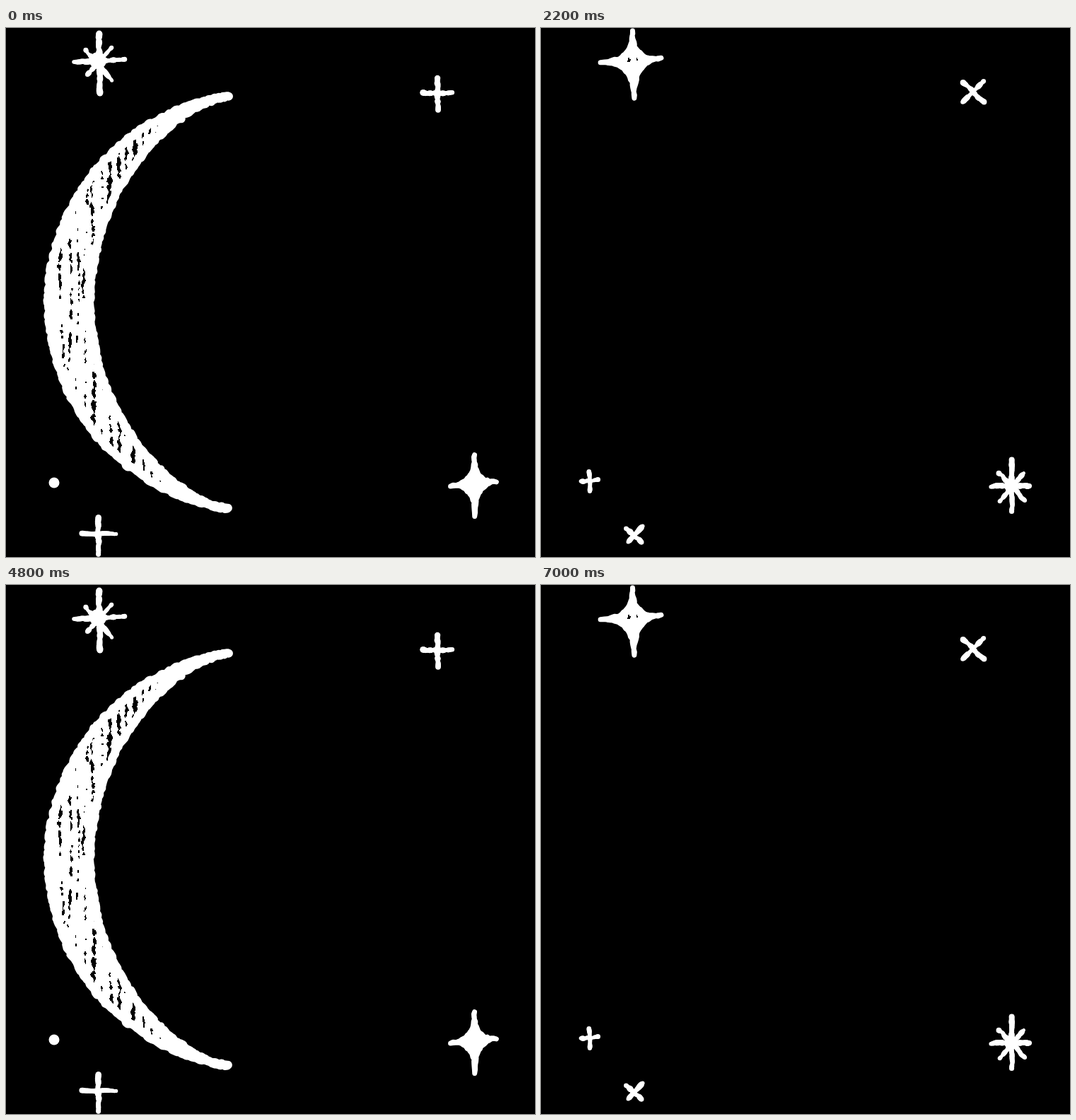
Animation of 748x748 px, one loop 7.2 s. Source, as an HTML page with a canvas:

```html
<!DOCTYPE html>
<html lang="en">
<head>
<meta charset="utf-8">
<title>Moon phases</title>
<style>
html, body { margin: 0; width: 100%; height: 100%; overflow: hidden; background: #000; }
canvas { display: block; width: 100vw; height: 100vh; }
</style>
</head>
<body>
<canvas id="sky" width="748" height="748"></canvas>
<script>
const ctx = document.getElementById('sky').getContext('2d');
const STEP = 200, COUNT = 12;
const CY = 388, RX = 299, RY = 295;

const hash = n => {
  const s = Math.sin(n * 127.1 + 11.7) * 43758.5453;
  return s - Math.floor(s);
};
// Smooth 1D noise in -1..1
const noise = (x, seed) => {
  const i = Math.floor(x), f = x - i, u = f * f * (3 - 2 * f);
  const a = hash(i + seed * 57.3), b = hash(i + 1 + seed * 57.3);
  return (a + (b - a) * u) * 2 - 1;
};

// side: lit edge, c: centre of disc, tip: x of the horns, edge: x of the terminator
const phases = [
  { side: -1, c: 359, tip: 314, edge: 119 },
  { side: -1, c: 360, tip: 335, edge: 190 },
  { side: -1, c: 361, tip: 355, edge: 358 },
  { side: -1, c: 364, tip: 364, edge: 555 },
  { side: -1, c: 360, tip: 360, edge: 659, full: true },
  { side: 1, c: 367, tip: 367, edge: 176 },
  { side: 1, c: 371, tip: 374, edge: 371 },
  { side: 1, c: 373, tip: 376, edge: 552 },
  { side: 1, c: 371, tip: 410, edge: 611 }
];

// Bold gaps in the chalk: x, top, bottom, width
const waxing = [
  [184, 150, 270, 8], [172, 240, 480, 6], [152, 180, 290, 5], [103, 360, 500, 6],
  [130, 350, 570, 4], [240, 120, 200, 6], [255, 115, 260, 6], [277, 105, 480, 8],
  [272, 470, 665, 9], [243, 500, 655, 7], [316, 420, 680, 11], [341, 95, 260, 8],
  [367, 260, 510, 7], [418, 330, 590, 6], [453, 150, 400, 7], [505, 210, 390, 7],
  [525, 250, 480, 6], [474, 440, 560, 6]
];
const waning = [
  [116, 225, 540, 9], [136, 205, 380, 8], [157, 390, 590, 8], [84, 295, 490, 6],
  [167, 175, 460, 5], [205, 190, 400, 5], [250, 120, 260, 9], [308, 105, 170, 9],
  [315, 260, 660, 7], [287, 350, 665, 9], [351, 100, 310, 8], [397, 300, 600, 8],
  [415, 100, 340, 6], [437, 110, 400, 7], [458, 290, 650, 6], [467, 110, 300, 8],
  [515, 140, 320, 7], [580, 200, 430, 8]
];

function roughPath(points, seed, amp) {
  ctx.beginPath();
  points.forEach(([x, y], i) =>
    ctx.lineTo(x + amp * noise(i * 0.8, seed), y + amp * noise(i * 0.8, seed + 3)));
  ctx.closePath();
}

function moonOutline({ side, c, tip, edge, full }) {
  const pts = [], n = 300;
  const end = Math.acos(side * (tip - c) / RX);
  const reach = RY * Math.sin(end);
  for (let i = 0; i <= n; i++) {
    const a = end * (2 * i / n - 1);
    pts.push([c + side * RX * Math.cos(a), CY + RY * Math.sin(a)]);
  }
  for (let i = 1; i < n; i++) {
    const a = Math.PI * (0.5 - i / n);
    const bulge = Math.pow(Math.cos(a), full ? 1 : 1.3);
    pts.push([tip + (edge - tip) * bulge, CY + reach * Math.sin(a)]);
  }
  return pts;
}

function streak(x, top, bottom, w, seed) {
  for (let y = top; y < bottom; y += 2) {
    const fade = Math.max(0, 1 - Math.min(y - top, bottom - y) / 30) * 4;
    const width = w - fade + 3.6 * noise(y / 4, seed) + 2.2 * noise(y / 45, seed + 5);
    if (width < 1) continue;
    const mid = x + 4 * noise(y / 120, seed + 9) + 1.3 * noise(y / 5, seed + 13);
    ctx.fillRect(Math.round(mid - width / 2), y, Math.round(width), 2);
  }
}

function hatch(index) {
  const thin = index < 2 || index > 6;
  let seed = 100 * (index + 1);
  if (thin) {
    const gap = index === 7 ? 16 : 11.5;
    for (let x = 55; x < 690; x += gap) {
      const w = index === 7 ? 3.5 + 3 * hash(seed) : 0.5 + 4 * hash(seed);
      let y = 80 + 60 * hash(seed + 1);
      while (y < 700) {
        const len = 130 + 200 * hash(seed + 2);
        streak(x, Math.round(y), Math.round(y + len), w, seed);
        y += len + 12;
        seed += 7;
      }
    }
    return;
  }
  for (const [x, top, bottom, w] of index < 4 ? waxing : waning)
    streak(x, top, bottom, w, seed += 7);
  for (let x = 70; x < 670; x += 8 + 5 * hash(seed)) {
    let y = 85 + 90 * hash(seed + 1);
    while (y < 690) {
      const len = 90 + 230 * hash(seed + 2);
      streak(x, Math.round(y), Math.round(y + len), -2 + 5.5 * hash(seed + 4), seed);
      y += len + 20;
      seed += 7;
    }
  }
}

function moon(index) {
  const phase = phases[index];
  if (!phase) return;
  roughPath(moonOutline(phase), index + 1, 1.8);
  ctx.fill();
  ctx.save();
  ctx.clip();
  ctx.fillStyle = '#000';
  hatch(index);
  ctx.restore();
  ctx.lineWidth = 12;
  ctx.stroke();
}

function dot(x, y, r) {
  ctx.beginPath();
  ctx.arc(x, y, r, 0, 7);
  ctx.fill();
}

function line(x1, y1, x2, y2, w) {
  const n = Math.ceil(Math.hypot(x2 - x1, y2 - y1) / 1.5), seed = x1 + y2;
  for (let i = 0; i <= n; i++) {
    const k = i / n, wob = noise(i / 4, seed + 2) * 0.8;
    dot(x1 + (x2 - x1) * k + wob, y1 + (y2 - y1) * k - wob, w / 2 + 0.9 * noise(i / 2.5, seed));
  }
}

function sparkle(cx, cy, tips) {
  const pts = [];
  tips.forEach((a, i) => {
    const b = tips[(i + 1) % 4];
    for (let k = 0; k < 1; k += 0.05) {
      const q = 1 - k;
      pts.push([
        q * q * a[0] + 2 * q * k * cx + k * k * b[0],
        q * q * a[1] + 2 * q * k * cy + k * k * b[1]
      ]);
    }
  });
  roughPath(pts, cx, 1);
  ctx.lineWidth = 7;
  ctx.fill();
  ctx.stroke();
}

function starsEven() {
  line(131, 9, 133, 92, 8);
  line(96, 48, 167, 45, 7);
  line(113, 31, 150, 74, 6);
  line(150, 27, 115, 66, 6);
  dot(130, 46, 12);
  line(610, 71, 611, 116, 7);
  line(589, 92, 630, 92, 7);
  sparkle(663, 645, [[662, 603], [693, 641], [663, 690], [629, 647]]);
  dot(68, 643, 7.5);
  line(130, 693, 131, 744, 8);
  line(107, 715, 156, 715, 7);
}

function starsOdd() {
  sparkle(130, 48, [[129, 3], [169, 43], [132, 99], [85, 48]]);
  ctx.fillStyle = '#000';
  streak(134, 28, 36, 5, 4);
  streak(123, 42, 48, 4, 6);
  streak(136, 42, 50, 4, 8);
  ctx.fillStyle = '#fff';
  line(597, 77, 626, 105, 6.5);
  line(626, 75, 596, 105, 6.5);
  line(68, 627, 69, 655, 7);
  line(56, 641, 80, 639, 6);
  line(120, 708, 142, 727, 7);
  line(143, 705, 123, 727, 7);
  line(665, 611, 666, 683, 7.5);
  line(637, 648, 691, 647, 7);
  line(648, 629, 684, 668, 6);
  line(682, 630, 649, 669, 6);
  dot(665, 647, 10);
}

function draw(index) {
  ctx.fillStyle = '#000';
  ctx.fillRect(0, 0, 748, 748);
  ctx.fillStyle = ctx.strokeStyle = '#fff';
  ctx.lineJoin = 'round';
  moon(index);
  if (index % 2) starsOdd();
  else starsEven();
}

let shown = -1;
function tick() {
  const index = Math.floor(performance.now() / STEP) % COUNT;
  if (index !== shown) draw(shown = index);
  requestAnimationFrame(tick);
}
tick();
</script>
</body>
</html>
```
